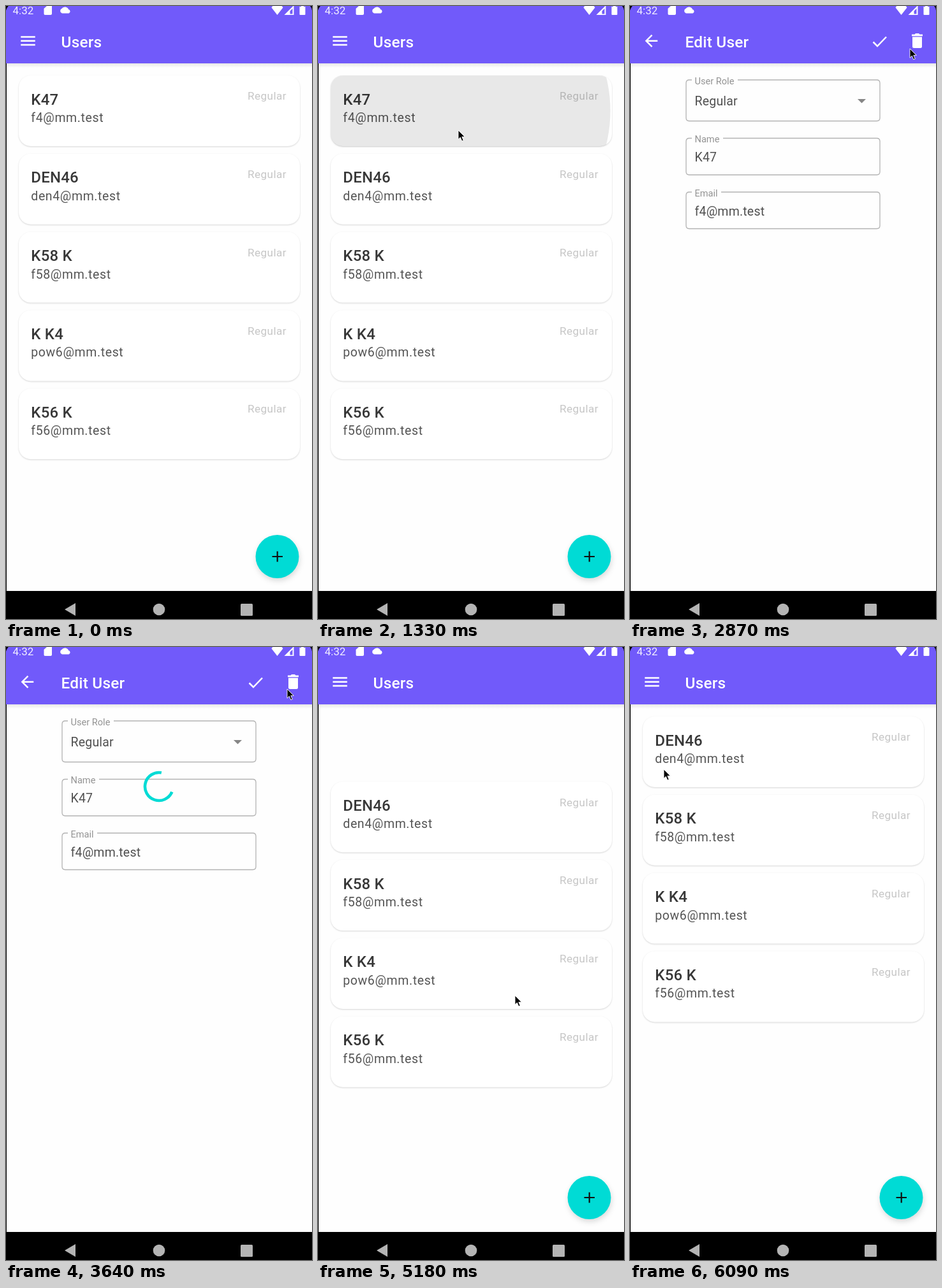
Recreate the animation shown at these times as an HTML page. Size 480 px wide and 962 px high, loop 6.16 s.

```html
<!DOCTYPE html>
<html lang="en">
<head>
<meta charset="utf-8">
<title>Users</title>
<style>
  html, body { margin: 0; width: 100%; height: 100%; overflow: hidden; background: #000; }
  svg { display: block; width: 100vw; height: 100vh; font-family: Roboto, "Noto Sans", sans-serif; }
  .title { font-size: 24.4px; font-weight: 500; letter-spacing: .2px; fill: #fff; }
  .name { font-size: 24px; font-weight: 500; letter-spacing: .2px; fill: #383838; }
  .mail { font-size: 19.5px; letter-spacing: .61px; fill: #555; }
  .role { font-size: 17.1px; letter-spacing: .45px; fill: #c6c6c6; }
  .card { fill: #fff; filter: drop-shadow(0 1px 1px rgba(0,0,0,.16)); }
  .box { fill: none; stroke: #b2b2b2; stroke-width: 1.3; }
  .hint, .value { font-size: 19.5px; letter-spacing: .2px; fill: #939393; }
  .value { fill: #505050; }
  .label { font-size: 14.6px; fill: #939393; }
  .fab { fill: #00dbd5; filter: drop-shadow(1px 4px 4px rgba(0,0,0,.14)); }
  .line { fill: none; stroke: #fff; stroke-width: 2.5; }
</style>
</head>
<body>
<svg viewBox="0 0 480 962" preserveAspectRatio="none">
  <defs>
    <linearGradient id="shade" x2="0" y2="1">
      <stop offset="0" stop-color="#000" stop-opacity=".09"/>
      <stop offset="1" stop-color="#000" stop-opacity="0"/>
    </linearGradient>
    <clipPath id="cardClip"><rect x="20" y="109" width="441" height="111.500" rx="19"/></clipPath>
  </defs>

  <rect width="480" height="962" fill="#000"/>
  <rect x="1" y="60" width="479" height="858" fill="#fefefe"/>

  <g id="list">
    <g id="cards"></g>
    <circle id="press" cx="237" cy="164.500" clip-path="url(#cardClip)"/>
    <circle class="fab" cx="425.500" cy="864" r="34"/>
    <path d="M417.500 864h16.500M425.700 855.700v16.500" stroke="#111" stroke-width="2.200"/>
  </g>

  <g id="blank"></g>
  <g id="filled"><path d="M357 146h13l-6.500 6.500z" fill="#868686"/></g>
  <path id="spin" fill="none" stroke="#00dbd5" stroke-width="4.600"/>

  <rect x="1" y="90" width="479" height="7" fill="url(#shade)"/>
  <path d="M0 90V7Q1 2 6 -2H475Q480 2 480 7V90z" fill="#715afa"/>
  <text x="10.500" y="13.300" font-size="17" fill="#f1eeff">4:32</text>
  <g fill="#fff">
    <path d="M64 0h8v12q0 2-2 2h-9q-1.500 0-1.500-2V4z"/>
    <path d="M88 11.500a4 4 0 0 1-.5-7.500 6 6 0 0 1 10.500 1.200 3.300 3.300 0 0 1 .5 6.300z"/>
    <path d="M416.500 2.500Q418 0 420 -1h11q2 1 3.500 3.500L425.500 14z"/>
    <path fill-rule="evenodd" d="M436.500 14L451.500 -1V14zM445.500 12.500h4V4l-4 4z"/>
    <path d="M460.500 1h2.500v-2h4v2h2.500v12q0 1-1 1h-7q-1 0-1-1z"/>
  </g>

  <path id="menu" class="line"/>
  <text id="title" class="title" x="86.600" y="65.400"></text>
  <path id="check" class="line" d="M440.500 56.500l6.500 6.500L461 48.500"/>
  <g id="trash">
    <circle id="tap" cx="450" cy="55.500" fill="#fff"/>
    <path fill="#fff" d="M442 44.500h4.500l1.500-1.500h5l1.500 1.500h4.500v2.700h-17zM443 48.500h15v15q0 2.500-2.500 2.500h-10q-2.500 0-2.500-2.500z"/>
  </g>

  <g fill="#b4b4b4">
    <path d="M92 947l17-10v20z"/>
    <circle cx="240" cy="947" r="9.300"/>
    <rect x="368" y="938" width="19" height="19" rx="1.500"/>
  </g>
  <path id="mouse" d="M0 0V14.300L3.300 11.200 5.800 17 8.200 16 5.800 10.300H10.300z" fill="#000" stroke="#fff" stroke-width=".9"/>
</svg>

<script>
const LOOP = 6160, STEP = 70, PITCH = 122.8, DP = 1.25;
const OPEN = 1433, LOADED = 2030, TAP = 3010, REMOVE = 3150, BACK = 4060, FADE = 4993, SLIDE = 5113;

const users = [
  ["K47", "f4@mm.test"], ["DEN46", "den4@mm.test"], ["K58 K", "f58@mm.test"],
  ["K K4", "pow6@mm.test"], ["K56 K", "f56@mm.test"]
];

// time, x, y
const track = [
  [350, 262, 958], [1060, 220, 195], [1400, 220, 195], [1800, 333, 397], [1900, 333, 397],
  [2240, 404, 226], [2330, 404, 226], [2800, 439, 67], [2900, 439, 67], [3010, 441, 66],
  [4780, 441, 66], [5180, 309, 547], [5390, 286, 540], [6020, 57, 195], [6090, 53, 192]
];

const $ = id => document.getElementById(id);
const set = (el, attrs) => { for (const k in attrs) el.setAttribute(k, attrs[k]); };
const show = (el, on) => set(el, { visibility: on ? "visible" : "hidden" });
const lerp = (a, b, p) => a + (b - a) * p;
const ramp = (t, from, len) => Math.min(1, Math.max(0, (t - from) / len));
const inOut = p => (1 - Math.cos(Math.PI * p)) / 2;
const out = p => 1 - (1 - p) ** 2;

// cubic-bezier(.4, 0, .2, 1)
function fastOut(x) {
  let a = 0, b = 1;
  for (let i = 0; i < 20; i++) {
    const s = (a + b) / 2;
    if (1.2 * s * (1 - s) ** 2 + .6 * s * s * (1 - s) + s ** 3 < x) a = s; else b = s;
  }
  return 3 * a * a * (1 - a) + a ** 3;
}

function add(parent, tag, attrs, text) {
  const el = document.createElementNS("http://www.w3.org/2000/svg", tag);
  set(el, attrs);
  if (text) el.textContent = text;
  return parent.appendChild(el);
}

const cards = users.map(([name, mail]) => {
  const g = add($("cards"), "g", {});
  add(g, "rect", { class: "card", x: 20, y: 109, width: 441, height: 111, rx: 19 });
  add(g, "text", { class: "name", x: 39.3, y: 154.5 }, name);
  add(g, "text", { class: "mail", x: 39.3, y: 182 }, mail);
  add(g, "text", { class: "role", x: 379, y: 147.3 }, "Regular");
  return g;
});

// An outlined field; a value moves the label up into a gap in the border.
function field(parent, top, height, label, value, base, gap) {
  const low = top + height;
  const start = value ? `M${gap} ${top}H387` : `M93 ${top}H387`;
  const end = value ? `Q88 ${top} 93 ${top}H97` : `Q88 ${top} 93 ${top}`;
  add(parent, "path", { class: "box",
    d: `${start}Q392 ${top} 392 ${top + 5}V${low - 5}Q392 ${low} 387 ${low}H93Q88 ${low} 88 ${low - 5}V${top + 5}${end}` });
  if (value) {
    add(parent, "text", { class: "label", x: 101.5, y: top + 6.5 }, label);
    add(parent, "text", { class: "value", x: 101.5, y: base }, value);
  } else {
    add(parent, "text", { class: "hint", x: 101.5, y: base }, label);
  }
}
field($("blank"), 116, 57.5, "Name", "", 151);
field($("blank"), 200.5, 57.5, "Email", "", 235.5);
field($("filled"), 116, 64.5, "User Role", "Regular", 156, 169);
field($("filled"), 207.5, 57.5, "Name", users[0][0], 244, 146);
field($("filled"), 292, 57.5, "Email", users[0][1], 328.5, 143);

// Three bars at p = 0, a left arrow at p = 1
function menuIcon(p) {
  const shaft = lerp(18, 16, p) * DP, cut = lerp(0, 1, p) * DP;
  const head = lerp(18, 11.3, p) * DP, turn = p * Math.PI / 4;
  const w = head * Math.cos(turn), h = head * Math.sin(turn);
  const edge = -shaft / 2, gap = lerp(5, -.7, p) * DP;
  set($("menu"), {
    d: `M${edge + cut} 0H${-edge - cut}M${edge} ${gap}l${w} ${h}M${edge} ${-gap}l${w} ${-h}`,
    transform: `translate(34.5 54.8) rotate(${-180 * (1 - p)})`
  });
}

function spinner(age, y) {
  const u = age / 1333 % 1;
  const head = 270 * fastOut(Math.min(1, u * 2));
  const tail = 270 * fastOut(Math.max(0, u * 2 - 1));
  const base = -90 + 90 * u + age * 720 / 4444 + Math.floor(age / 1333) * 360;
  const point = deg => {
    const a = (base + deg) * Math.PI / 180;
    return `${240 + 22 * Math.cos(a)} ${y + 22 * Math.sin(a)}`;
  };
  const sweep = Math.max(8, head - tail);
  set($("spin"), { d: `M${point(tail)}A22 22 0 ${sweep > 180 ? 1 : 0} 1 ${point(tail + sweep)}` });
}

function mouse(t) {
  show($("mouse"), t >= track[0][0]);
  const i = Math.max(1, track.findIndex(k => k[0] >= t));
  const a = track[i - 1], b = track[i];
  const p = inOut(ramp(t, a[0], b[0] - a[0]));
  set($("mouse"), { transform: `translate(${lerp(a[1], b[1], p)} ${lerp(a[2], b[2], p)})` });
}

function draw(t) {
  const editing = t >= OPEN && t < BACK, loaded = editing && t >= LOADED;
  show($("list"), !editing);
  show($("blank"), editing && !loaded);
  show($("filled"), loaded);
  show($("check"), editing);
  show($("trash"), loaded);
  set($("check"), { transform: `translate(${loaded ? -59 : 0} 0)` });
  $("title").textContent = editing ? "Edit User" : "Users";
  menuIcon(t < BACK ? inOut(ramp(t, OPEN, 300)) : 1 - inOut(ramp(t, BACK, 300)));

  const pressed = t < OPEN ? ramp(t, 1162, 75) : 0;
  set($("press"), { r: lerp(70, 232, out(ramp(t, 1162, 225))), "fill-opacity": .092 * pressed });
  set($("tap"), {
    r: lerp(8, 24, out(ramp(t, TAP, 225))),
    "fill-opacity": .24 * ramp(t, TAP - 40, 75) * (1 - ramp(t, TAP + 200, 220))
  });

  const busy = editing && (!loaded || t >= REMOVE);
  show($("spin"), busy);
  if (busy) spinner(loaded ? t - REMOVE : t - OPEN, loaded ? 219 : 174);

  const lift = inOut(ramp(t, SLIDE, 250));
  cards.forEach((g, i) => set(g, { transform: `translate(0 ${PITCH * (i && i - lift)})` }));
  set(cards[0], { opacity: 1 - ramp(t, FADE, SLIDE - FADE) });
  mouse(t);
}

const began = performance.now();
function tick() {
  const t = (performance.now() - began) % LOOP;
  draw(Math.floor(t / STEP) * STEP);
  requestAnimationFrame(tick);
}
tick();
</script>
</body>
</html>
```
